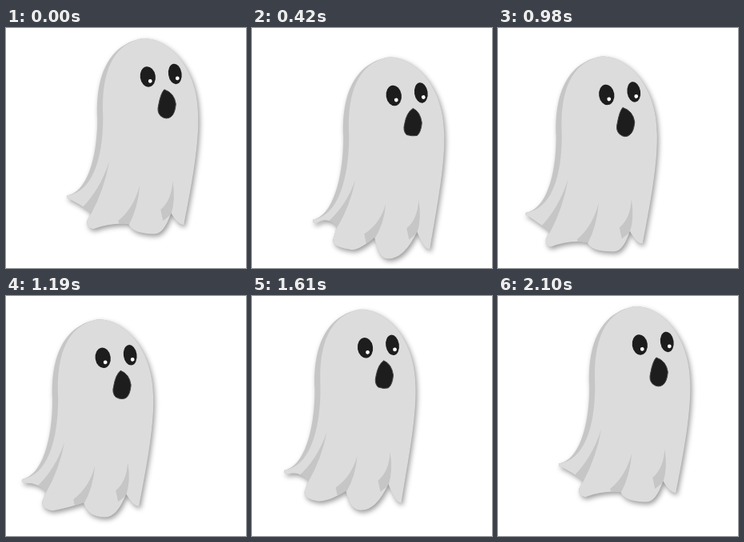
An HTML page with a canvas that plays this animation: 300 px wide and 300 px high, repeating every 2.17 s.

```html
<!DOCTYPE html>
<html>
<head>
<meta charset="utf-8">
<style>
html, body { margin: 0; width: 100%; height: 100%; overflow: hidden; background: #fff; }
canvas { display: block; }
</style>
</head>
<body>
<canvas id="stage" width="300" height="300"></canvas>
<script>
const c = document.getElementById('stage').getContext('2d');
const { sin, cos, PI } = Math;
const STEP = 70, STEPS = 31, LAP = 2100, SWAY = LAP / 2;
const INK = '#1d1d1d', SHEET = '#dcdcdc', SHADE = '#c6c6c6';

// One slow loop around the stage
function drift(t) {
  const a = 2 * PI * (t / LAP - 0.1), b = 2 * PI * (t / LAP - 1 / 3);
  return [
    -23.4 + 30.5 * cos(a) + 3.2 * cos(3 * a),
    12.1 + 12 * cos(b) - 0.6 * cos(2 * b) - 3.45 * cos(3 * b) + 1.7 * sin(b) - 1.8 * sin(2 * b)
  ];
}

const swing = (t, lag) => cos(2 * PI * (t / SWAY - lag));

// Tips of the four tails and the notches between them, left to right
function pose(t) {
  const [a, b, d, e] = [0.36, 0.38, 0.42, 0.55].map(lag => swing(t, lag));
  return {
    a, b, d,
    tips: [[76, 212 + 4 * a], [114 + 7 * b, 252 + b], [178 - 8 * d, 261 + 4 * d], [222, 250.5 + 4.5 * e]],
    notches: [[106, 228 - 4 * a], [153, 242 - 4 * b], [206, 231]]
  };
}

// inset moves the left edge inwards, leaving the shaded side visible
function outline({ a, b, d, tips, notches }, inset) {
  const [t1, t2, t3, t4] = tips, [n1, n2, n3] = notches;
  const p = new Path2D();
  const curve = (x, y, end) => p.quadraticCurveTo(x, y, ...end);
  p.moveTo(...t1);
  p.bezierCurveTo(t1[0] + 24 + inset, t1[1] - 4, 114 + inset, 165, 114 + inset, 112);
  p.bezierCurveTo(112 + inset, 70, 122 + inset / 2, 22, 170, 13);
  p.bezierCurveTo(205, 12, 240, 52, 240, 110);
  p.bezierCurveTo(241, 150, 230, 205, ...t4);
  curve(t4[0] - 8, t4[1], n3);
  curve(194 - 4 * d, t3[1], t3);
  curve(157, t3[1], n2);
  curve(131, 249 + 8 * b, t2);
  curve(100, 250, [101, 241]);
  p.lineTo(...n1);
  curve(93, 217 - 6 * a, [80, t1[1] + 5]);
  curve(t1[0] - 2, t1[1] + 4, t1);
  return p;
}

// Crescent of shade from a crease down to a notch
function fold(x, y, [nx, ny]) {
  const mx = (x + nx) / 2, my = (y + ny) / 2 + 4;
  c.beginPath();
  c.moveTo(x, y);
  c.quadraticCurveTo(mx, my, nx - 13, ny - 4);
  c.lineTo(nx - 10, ny + 10);
  c.lineTo(nx, ny + 2);
  c.quadraticCurveTo(mx + 5, my, x, y);
  c.fill();
}

function drawBody(p) {
  const side = outline(p, 0);
  c.save();
  c.shadowColor = 'rgba(0,0,0,.4)';
  c.shadowBlur = 6;
  c.shadowOffsetX = 2;
  c.shadowOffsetY = 3;
  c.fillStyle = SHADE;
  c.fill(side);
  c.restore();

  c.save();
  c.clip(side);
  c.fillStyle = SHEET;
  c.fill(outline(p, 7));
  c.fillStyle = SHADE;
  fold(129, 166, p.notches[0]);
  fold(167, 196, p.notches[1]);
  fold(208, 191, p.notches[2]);
  c.restore();
}

function ellipse(x, y, rx, ry, color) {
  c.fillStyle = color;
  c.beginPath();
  c.ellipse(x, y, rx, ry, -0.15, 0, 2 * PI);
  c.fill();
}

function drawEye(x, y, rx) {
  ellipse(x, y, rx, 12.8, INK);
  ellipse(x + 3, y + 5.5, 2.4, 2.4, '#fff');
}

function drawMouth(m) {
  const top = [199 + 2 * m, 77];
  c.beginPath();
  c.moveTo(...top);
  c.quadraticCurveTo(210, 81, 212, 95);
  c.quadraticCurveTo(211, 107, 206, 111);
  c.quadraticCurveTo(200, 114 - 2 * m, 193, 110);
  c.quadraticCurveTo(188, 105, 190.5, 96);
  c.quadraticCurveTo(193, 82, ...top);
  c.closePath();
  c.fillStyle = INK;
  c.strokeStyle = '#444';
  c.fill();
  c.stroke();
}

function draw(now) {
  const t = Math.floor(now / STEP) % STEPS * STEP % LAP;
  const p = pose(t);
  c.clearRect(0, 0, 300, 300);
  c.save();
  c.translate(...drift(t));
  drawBody(p);
  drawEye(177, 61, 9.6);
  drawEye(211, 57.5, 8.3);
  drawMouth(p.b);
  c.restore();
}

const start = performance.now();
function tick() {
  draw(performance.now() - start);
  requestAnimationFrame(tick);
}
tick();
</script>
</body>
</html>
```
